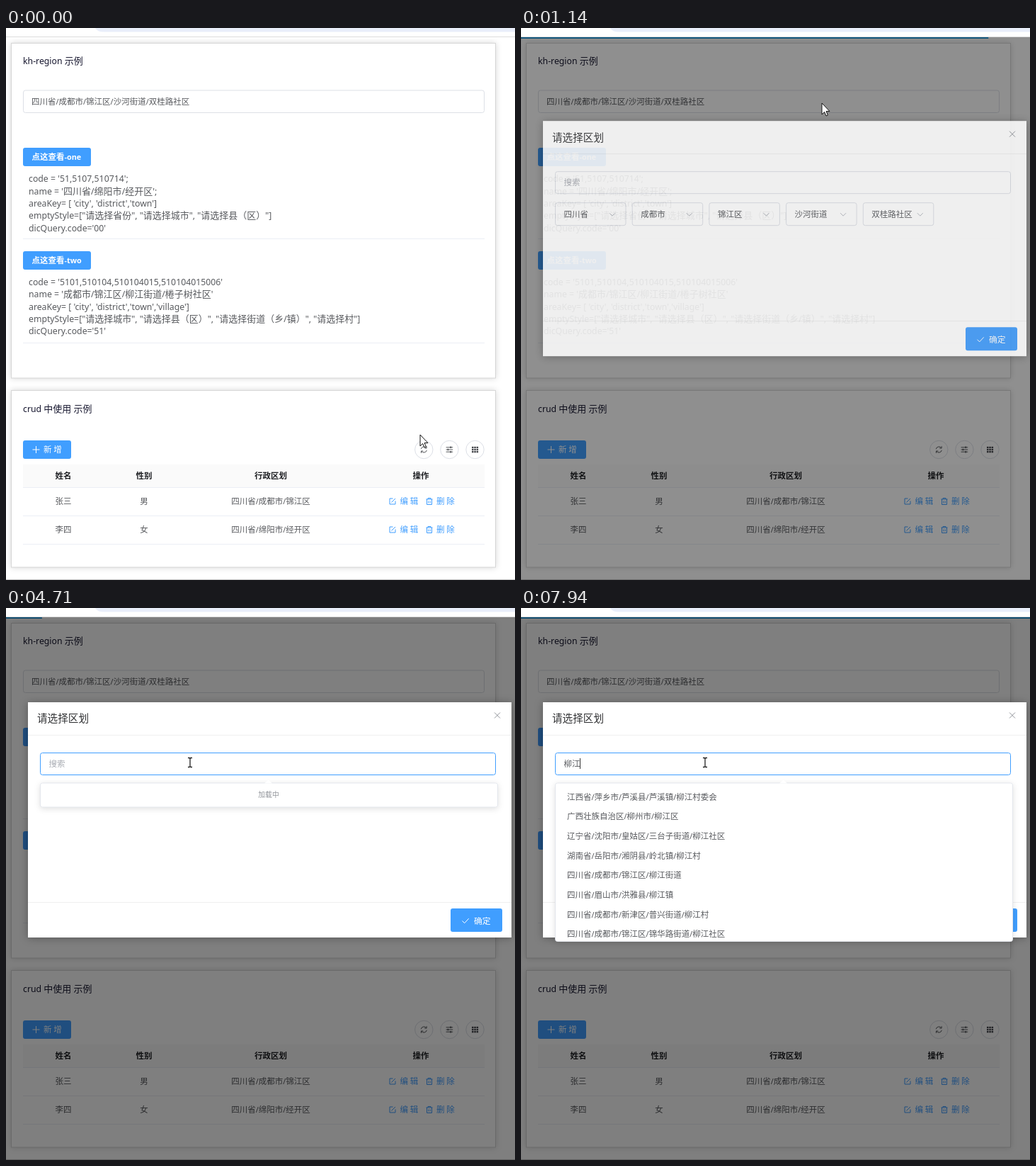
These frames come from a looping animation (719 by 779 pixels, 8 s). An HTML page:

```html
<!DOCTYPE html>
<html lang="zh-CN">
<head>
<meta charset="utf-8">
<title>kh-region</title>
<style>
html, body { margin: 0; width: 719px; height: 779px; overflow: hidden; background: #fff; }
svg { display: block; }
text { white-space: pre; font-family: "Noto Sans CJK SC", "Noto Sans CJK", "Noto Sans", sans-serif; }
.en { font-family: "Noto Sans", "Open Sans", sans-serif; font-size: .945em; }
.card { fill: #fff; stroke: #d6d6d6; filter: drop-shadow(0 0 4px rgba(0,0,0,.16)); }
.dialog { fill: #fff; filter: drop-shadow(0 1px 6px rgba(0,0,0,.3)); }
.pop { fill: #fff; stroke: #e4e7ed; filter: drop-shadow(0 2px 4px rgba(0,0,0,.12)); }
</style>
</head>
<body>
<svg id="stage" width="719" height="779" viewBox="0 0 719 779"></svg>
<script>
const LOOP = 8000, STEP = 77.3, SHIFT = 1060;
const BLUE = '#409eff', GREY = '#585a5e', EDGE = '#dcdfe6', HOVER = '#c0c4cc', RULE = '#ebeef5', INK = '#17172f';

// ---- drawing helpers: text is placed by its vertical middle ----
const mix = s => s.replace(/[\x20-\x7e]+/g, m => `<tspan class="en">${m}</tspan>`);
const text = (x, y, s, size = 11.5, fill = GREY, more = '') =>
  `<text x="${x}" y="${y + size * .37}" font-size="${size}" fill="${fill}" ${more}>${mix(s)}</text>`;
const mid = 'text-anchor="middle"';
const box = (x, y, w, h, more) => `<rect x="${x}" y="${y}" width="${w}" height="${h}" ${more}/>`;
const field = (x, y, w, h, id = '') => box(x, y, w, h, `rx="3" fill="#fff" stroke="${EDGE}" ${id}`);
const button = (x, y, w, h) => box(x, y, w, h, `rx="3" fill="${BLUE}"`);
const rule = (x1, x2, y, c = RULE) => `<path d="M${x1} ${y}H${x2}" stroke="${c}"/>`;
const line = (d, c, w = 1, more = '') => `<path d="${d}" fill="none" stroke="${c}" stroke-width="${w}" ${more}/>`;
const group = (id, body, more = '') => `<g id="${id}" ${more}>${body}</g>`;
const at = (x, y, body) => `<g transform="translate(${x} ${y})">${body}</g>`;
const lines = (y, list) => list.map((s, i) => text(32, y + i * 17.4, s, 13)).join('');

const editIcon = line('M.5 -4H-4V4H4V-.5M-1.5 1.5L4 -4', BLUE);
const binIcon = line('M-4.5 -3H4.5M-2 -3V-4.5H2V-3M-3.5 -3V4.5H3.5V-3M-1.2 -.5V2.5M1.2 -.5V2.5', BLUE);
const turnIcon = line('M-4 -.8A4.1 4.1 0 0 1 3.4 -2.3M4 .8A4.1 4.1 0 0 1 -3.4 2.3M3.8 -4.8V-2H1M-3.8 4.8V2H-1', GREY);
const tuneIcon = line('M-4.8 -3.2H4.8M-4.8 0H4.8M-4.8 3.2H4.8', GREY) +
  line('M1.8 -4.4V-2M-2 -1.2V1.2M1.8 2V4.4', GREY, 1.8);
const gridIcon = [0, 1, 2, 3, 4, 5, 6, 7, 8].map(i =>
  box(-4.5 + i % 3 * 3.3, -4.2 + Math.floor(i / 3) * 3.1, 2.5, 2.3, 'fill="#45474c"')).join('');

const row = (y, name, sex, area) =>
  text(81, y, name, 11.5, GREY, mid) + text(195, y, sex, 11.5, GREY, mid) + text(374, y, area, 11.5, GREY, mid) +
  at(546, y, editIcon) + text(556.5, y, '编 辑', 11.5, BLUE) +
  at(598, y, binIcon) + text(608, y, '删 除', 11.5, BLUE) + rule(24, 676, y + 20.5);

const page =
  box(0, 0, 719, 779, 'fill="#fff"') +
  box(7.5, 21.5, 684, 472.5, 'class="card"') +
  text(24, 46.5, 'kh-region 示例', 13, INK) +
  field(24.5, 88, 651, 31.5, 'id="area"') +
  text(36, 104, '四川省/成都市/锦江区/沙河街道/双桂路社区') +
  button(24, 169, 96, 26) + text(36.5, 182, '点这查看-one', 11.5, '#fff', 'font-weight="700"') +
  lines(212.3, ["code = '51,5107,510714';", "name = '四川省/绵阳市/经开区';", "areaKey= [ 'city', 'district','town']",
    'emptyStyle=["请选择省份", "请选择城市", "请选择县（区）"]', "dicQuery.code='00'"]) +
  rule(24, 676, 297.5) +
  button(24, 315, 96, 26) + text(36.5, 328, '点这查看-two', 11.5, '#fff', 'font-weight="700"') +
  lines(358, ["code = '5101,510104,510104015,510104015006'", "name = '成都市/锦江区/柳江街道/棬子树社区'",
    "areaKey= [ 'city', 'district','town','village']",
    'emptyStyle=["请选择城市", "请选择县（区）", "请选择街道（乡/镇）", "请选择村"]', "dicQuery.code='51'"]) +
  rule(24, 676, 444.5) +
  box(7.5, 511.5, 684, 249.5, 'class="card"') +
  text(24, 537.5, 'crud 中使用 示例', 13, INK) +
  button(24, 582, 68, 26) + line('M37.5 595H47.5M42.5 590V600', '#fff') + text(53, 595, '新 增', 11.5, '#fff') +
  [turnIcon, tuneIcon, gridIcon].map((icon, i) =>
    at(590.3 + i * 36.1, 595, `<circle r="12.7" fill="#fff" stroke="${EDGE}"/>` + icon)).join('') +
  box(24, 616, 652, 32, 'fill="#fafafa"') +
  [[81, '姓名'], [195, '性别'], [374, '行政区划'], [586, '操作']].map(([x, s]) =>
    text(x, 632, s, 11.5, '#1f2024', mid + ' font-weight="700"')).join('') +
  rule(24, 676, 648.5) +
  row(668, '张三', '男', '四川省/成都市/锦江区') +
  row(708, '李四', '女', '四川省/绵阳市/经开区') +
  rule(0, 719, 778.5, '#c4c4c4');

const chrome = box(0, 0, 719, 13, 'fill="#fff"') +
  '<path d="M126 0Q129 5.5 138 5.5H719V0Z" fill="#e9eefa"/>' + rule(0, 719, 12.5, '#dcdcdc');

const picks = ['四川省', '成都市', '锦江区', '沙河街道', '双桂路社区'];
const codes = ['四川省', '5101', '锦江区', '沙河街道', '51010401...'];
const labels = list => list.map((s, i) => text(60.5 + i * 108.7, 265, s)).join('');

const dialog =
  box(31, 133, 683, 332, 'class="dialog"') +
  text(44, 156, '请选择区划', 14.6, '#303133') +
  line('M690 147.5L698 155.5M698 147.5L690 155.5', '#909399') +
  rule(31, 714, 179.5, '#f0f0f0') + rule(31, 714, 415.5, '#f0f0f0') +
  field(48.5, 204.5, 643, 31, 'id="search"') +
  group('hint', text(60.5, 220, '搜索', 11.5, '#a9acb3')) + group('typed', '') +
  box(0, 212, 1, 15, 'id="caret" fill="#333"') +
  picks.map((s, i) => field(48.5 + i * 108.7, 248.5, 99.5, 32) +
    line(`M${125 + i * 108.7} 263l4 4l4 -4`, '#b4b8c0')).join('') +
  group('codes', labels(codes)) + group('names', labels(picks)) +
  button(628, 424, 73, 33) + line('M644.5 441.5l3.2 3.2l6 -6.5', '#fff') + text(661, 441.5, '确定', 11.8, '#fff');

const results = ['江西省/萍乡市/芦溪县/芦溪镇/柳江村委会', '广西壮族自治区/柳州市/柳江区',
  '辽宁省/沈阳市/皇姑区/三台子街道/柳江社区', '湖南省/岳阳市/湘阴县/岭北镇/柳江村',
  '四川省/成都市/锦江区/柳江街道', '四川省/眉山市/洪雅县/柳江镇',
  '四川省/成都市/新津区/普兴街道/柳江村', '四川省/成都市/锦江区/锦华路街道/柳江社区'];
const notch = '<path d="M365 247.5L370.5 242.5L376 247.5Z" fill="#fff"/>';

const popup =
  group('pop',
    box(48.5, 247, 646, 34, 'id="sheet" class="pop" rx="3"') + notch +
    group('empty', text(371, 263, '无数据', 9.8, '#909399', mid)) +
    group('loading', text(371, 263, '加载中', 9.8, '#909399', mid)) +
    group('results', results.map((s, i) => text(65, 266.5 + i * 27.65, s)).join(''))) +
  group('ime', box(.5, 0, 364, 56, 'id="panel" fill="#fff" stroke="#d0d3d9"') +
    group('spell', '') + group('cands', ''));

const arrow = '<path d="M0 0V16L3.7 12.5L6 18L8.4 17L6.1 11.6H11Z" fill="#fff" stroke="#111" stroke-linejoin="round"/>';
const beam = line('M-3 -6.5H-1L0 -5.5L1 -6.5H3M0 -5.5V5.5M-3 6.5H-1L0 5.5L1 6.5H3', '#222', 1.3);

document.getElementById('stage').innerHTML = page +
  box(0, 13, 719, 2, 'id="bar" fill="#29d"') +
  box(0, 13, 719, 766, 'id="shade" fill="#000"') + chrome +
  group('dialog', dialog) + popup +
  group('mouse', group('arrow', arrow) + group('beam', beam));

// ---- motion ----
const el = {};
document.querySelectorAll('[id]').forEach(n => el[n.id] = n);
const set = (id, k, v) => el[id].setAttribute(k, v);
const show = (id, on) => set(id, 'visibility', on ? 'inherit' : 'hidden');
const within = (t, ...spans) => spans.some(([a, b]) => t >= a && t < b);
const smooth = u => u * u * (3 - 2 * u);
function key(t, list, ease = u => u) {
  if (t <= list[0][0]) return list[0][1];
  for (let i = 1; i < list.length; i++) {
    const [t0, a] = list[i - 1], [t1, b] = list[i];
    if (t < t1) return a + (b - a) * ease((t - t0) / (t1 - t0));
  }
  return list[list.length - 1][1];
}

const mouseX = [[70, 585], [830, 425], [1200, 425], [1750, 341], [2360, 260]];
const mouseY = [[70, 574], [830, 106], [1200, 106], [1750, 277], [2360, 218]];
const barW = [[970, 0], [1060, 170], [1137, 660], [1215, 719], [4300, 719], [4301, 0], [4390, 0], [4700, 52],
  [5005, 52], [5160, 719], [7000, 719], [7001, 0], [7170, 20], [7780, 20], [7930, 719]];
const barA = [[1290, 1], [1700, 0], [4300, 0], [4301, 1], [5250, 1], [5650, 0], [7000, 0], [7001, 1]];
// start, end, x, width, spelling, candidates
const typing = [
  [5465, 5545, 60, 365, 'l', '了来里老两'],
  [5545, 5695, 60, 365, 'li', '里李力离利'],
  [5695, 6235, 60, 365, 'liu', '柳六留流刘'],
  [6405, 6545, 70, 358, 'j', '就家及将见'],
  [6545, 6635, 70, 422, 'jiang', '江将讲降奖']];

function draw(t) {
  const x = key(t, mouseX, smooth), y = key(t, mouseY, smooth);
  const opened = t > 970;
  const overArea = !opened && y > 88 && y < 120;
  const overSearch = t > 1750 && y < 236;
  set('mouse', 'transform', `translate(${x.toFixed(2)} ${y.toFixed(2)})`);
  show('arrow', !overSearch);
  show('beam', overSearch);
  set('area', 'stroke', overArea || within(t, [970, 1100]) ? HOVER : EDGE);

  set('shade', 'opacity', key(t, [[970, 0], [1060, .28], [1137, .44], [1215, .5]]));
  const p = key(t, [[970, 0], [1060, .45], [1137, .86], [1215, .97], [1290, 1]]);
  set('dialog', 'opacity', p);
  set('dialog', 'transform', `translate(0 ${-13 * (1 - p)})`);
  show('codes', t < 1130);
  show('names', t >= 1130);

  set('bar', 'width', key(t, barW));
  set('bar', 'opacity', key(t, barA));

  set('search', 'stroke', t > 2520 ? BLUE : overSearch ? HOVER : EDGE);
  set('search', 'stroke-opacity', t > 2520 ? key(t, [[2520, .4], [2800, 1]]) : 1);
  const word = t < 6235 ? '' : t < 6635 ? '柳' : '柳江';
  el.typed.innerHTML = text(60.5, 220, word);
  show('hint', !word);
  set('caret', 'x', [60.5, 71, 83][word.length]);
  show('caret', within(t, [2675, 3225], [3765, 4395], [5005, 7165], [7785, LOOP]));

  const grow = 1 - (1 - key(t, [[3690, 0], [4070, 1]])) ** 3;
  const list = t >= 7785, busy = within(t, [4395, 5080], [7025, 7785]);
  set('pop', 'opacity', grow);
  set('pop', 'transform', `translate(0 ${242 * (1 - grow)}) scale(1 ${grow})`);
  set('sheet', 'height', list ? 223.5 : 34);
  show('loading', busy);
  show('empty', !busy && !list);
  show('results', list);

  const ime = typing.find(w => within(t, w));
  show('ime', !!ime);
  if (ime) {
    const [, , left, width, spell, cands] = ime;
    set('ime', 'transform', `translate(${left} 232.5)`);
    set('panel', 'width', width - 1);
    el.spell.innerHTML = text(10, 15, spell, 13, '#333');
    el.cands.innerHTML = [...cands].map((c, i) =>
      text(10 + i * 46, 40, `${i + 1}.${c}`, 14, i ? '#333' : '#d8502c')).join('');
  }
}

function tick(now) {
  const t = now % LOOP;
  draw(Math.max(0, SHIFT + Math.floor((t - SHIFT) / STEP) * STEP));
  requestAnimationFrame(tick);
}
draw(0);
requestAnimationFrame(tick);
</script>
</body>
</html>
```
